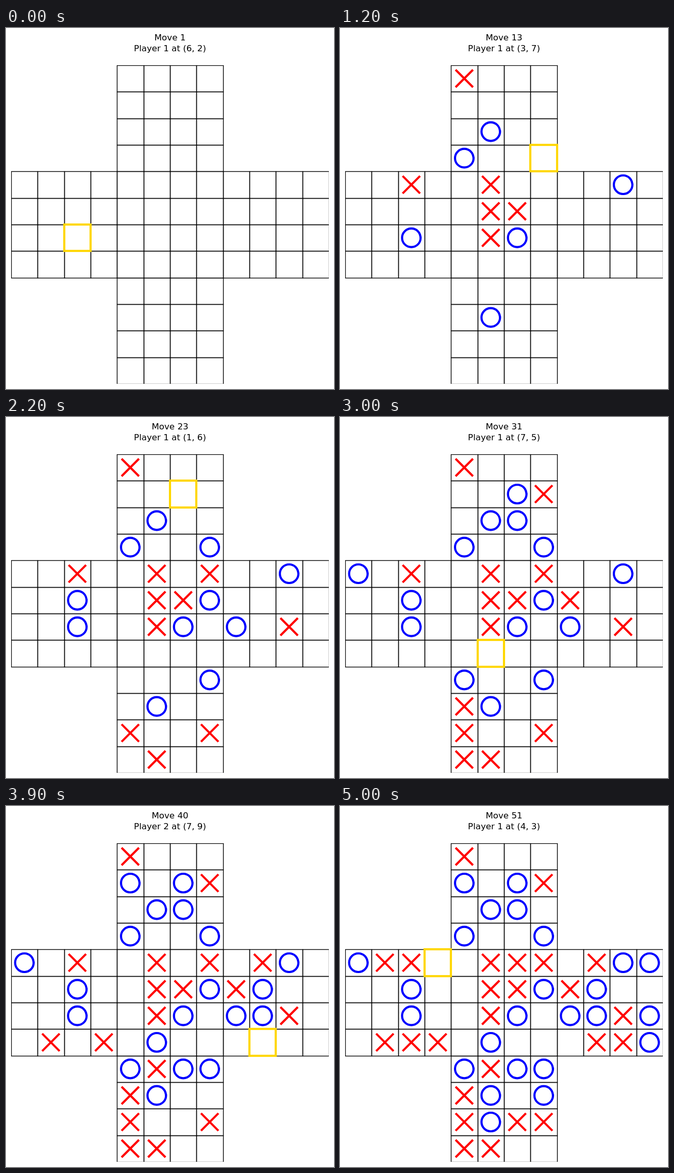
An HTML page with a canvas that plays this animation: 636 by 698 pixels, repeating every 5.1 s.

```html
<!DOCTYPE html>
<html lang="en">
<head>
<meta charset="utf-8">
<title>Cross board game</title>
<style>
  html, body { margin: 0; height: 100%; overflow: hidden; background: #fff; }
  canvas { display: block; }
</style>
</head>
<body>
<canvas id="stage" width="636" height="698"></canvas>
<script>
const ctx = document.getElementById('stage').getContext('2d');
const LEFT = 10, TOP = 72, CELLS = 12, SIZE = 616, CELL = SIZE / CELLS;
const STEP_MS = 100;

// Cells as row,column; the players alternate, O first.
const moves = `6,2 5,6 6,6 6,5 9,5 5,5 2,5 4,2 4,10 4,5 3,4 0,4 3,7
  11,5 5,2 10,4 6,8 10,7 5,7 6,10 8,7 4,7 1,6 1,7 4,0 5,8 2,6 9,4 8,4 11,4
  7,5 7,3 8,6 7,1 1,4 4,9 5,9 8,5 6,9 7,9 9,7 4,1 7,11 7,10 6,11 4,6
  4,11 10,6 10,5 7,2 4,3`.split(/\s+/).map(cell => cell.split(',').map(Number));

const edgeX = col => Math.round(LEFT + col * CELL);
const edgeY = row => Math.round(TOP + row * CELL);
const inMiddle = i => i >= 4 && i < 8;

function strokeCell(row, col, color, width, offset) {
  const x = edgeX(col), y = edgeY(row);
  ctx.strokeStyle = color;
  ctx.lineWidth = width;
  ctx.strokeRect(x + offset, y + offset, edgeX(col + 1) - x, edgeY(row + 1) - y);
}

function drawGrid() {
  for (let row = 0; row < CELLS; row++)
    for (let col = 0; col < CELLS; col++)
      if (inMiddle(row) || inMiddle(col)) strokeCell(row, col, '#000', 1.39, 0.5);
}

function drawMark([row, col], isCircle) {
  const x = LEFT + (col + 0.5) * CELL, y = TOP + (row + 0.5) * CELL;
  ctx.lineWidth = 4.17;
  ctx.lineCap = 'square';
  ctx.strokeStyle = isCircle ? '#00f' : '#f00';
  ctx.beginPath();
  if (isCircle) {
    ctx.arc(x, y, 0.35 * CELL, 0, 2 * Math.PI);
  } else {
    const arm = 0.3 * CELL;
    ctx.moveTo(x - arm, y - arm);
    ctx.lineTo(x + arm, y + arm);
    ctx.moveTo(x - arm, y + arm);
    ctx.lineTo(x + arm, y - arm);
  }
  ctx.stroke();
}

function drawTitle(index) {
  const [row, col] = moves[index];
  ctx.fillStyle = '#000';
  ctx.font = '16.67px "DejaVu Sans", sans-serif';
  ctx.textAlign = 'center';
  ctx.fillText(`Move ${index + 1}`, 318, 24);
  ctx.fillText(`Player ${index % 2 + 1} at (${row}, ${col})`, 318, 45);
}

function draw(index) {
  ctx.fillStyle = '#fff';
  ctx.fillRect(0, 0, 636, 698);
  drawTitle(index);
  ctx.save();
  ctx.beginPath();
  ctx.rect(LEFT, TOP, SIZE, SIZE);
  ctx.clip();
  drawGrid();
  moves.slice(0, index).forEach((cell, i) => drawMark(cell, i % 2 === 0));
  strokeCell(...moves[index], '#ffd700', 4.17, 0);
  ctx.restore();
}

const start = performance.now();
function tick() {
  draw(Math.floor((performance.now() - start) / STEP_MS) % moves.length);
  requestAnimationFrame(tick);
}
tick();
</script>
</body>
</html>
```
